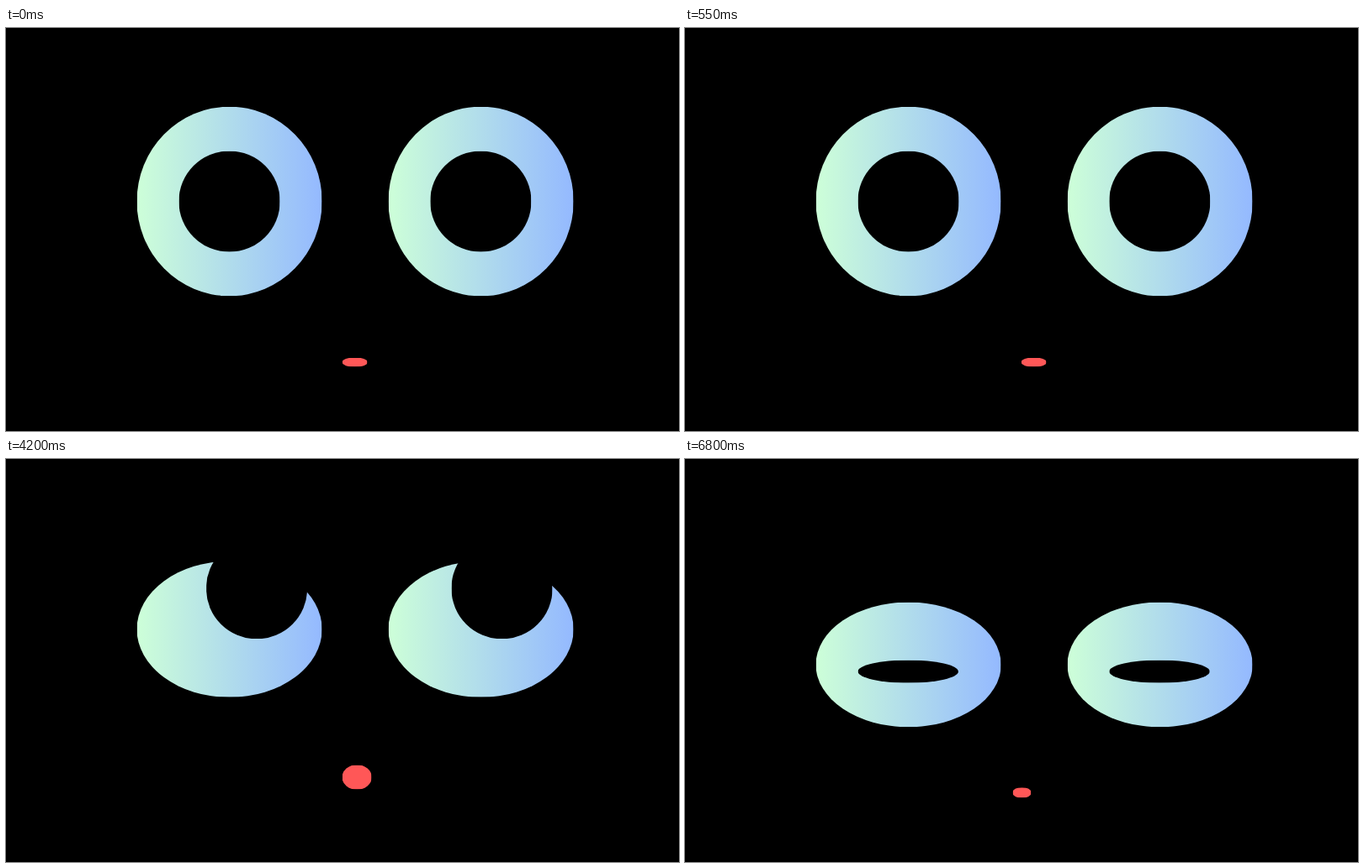
These frames come from a looping animation (800 by 480 pixels, 8000 ms). An HTML page:

```html
<!DOCTYPE html>
<html lang="en">
<head>
<meta charset="utf-8">
<title>Blinking eyes</title>
<style>
html, body { margin: 0; width: 100%; height: 100%; overflow: hidden; background: #000; }
body > svg { display: block; width: 100vw; height: 100vh; }
</style>
</head>
<body>
<svg id="stage" viewBox="0 0 800 480">
  <defs>
    <linearGradient id="iris">
      <stop offset="0" stop-color="#cdffd8"/>
      <stop offset="1" stop-color="#94b9ff"/>
    </linearGradient>
  </defs>
</svg>
<script>
const LOOP = 8000;
const NS = 'http://www.w3.org/2000/svg';
const stage = document.getElementById('stage');

// An ellipse trimmed slightly by its own box, which flattens its extremes.
function oval(fill, trim) {
  const box = document.createElementNS(NS, 'svg');
  const shape = document.createElementNS(NS, 'ellipse');
  box.setAttribute('overflow', 'hidden');
  shape.setAttribute('fill', fill);
  box.append(shape);
  stage.append(box);
  return (left, top, right, bottom) => {
    const w = right - left, h = bottom - top;
    const set = (el, attrs) => {
      for (const key in attrs) el.setAttribute(key, attrs[key]);
    };
    set(box, { x: left, y: top, width: w, height: h });
    set(shape, { cx: w / 2, cy: h / 2, rx: w / 2 + trim, ry: h / 2 + trim });
  };
}

const eyes = [oval('url(#iris)', 0.3), oval('url(#iris)', 0.3)];
const pupils = [oval('#000', 0.3), oval('#000', 0.3)];
const mouth = oval('#ff5757', 0.5);

const EYE_X = [155.8, 454.8];
const EYE_W = 219.6;
const OPEN = [94, 319];
const CENTRE = { x: [205.7, 504.5], y: [146.7, 266.4] };
const GLANCE = { x: [229, 517.8], y: [120, 240] };
const LOOK_UP = { x: [238.2, 529.7], y: [94.2, 214] };
const SLIT_TOP = 239.8;
const FLAT = [400, 392.9, 429.3, 403.3];
const ROUND = [400, 364.8, 434.3, 393.3];
const SMALL = [389.8, 391.5, 411.2, 403.3];

const mix = (a, b, k) => a + (b - a) * k;
const steps = (t, start, length) => Math.floor((t - start) / length) + 1;

function lids(t) {
  const [top, bottom] = OPEN;
  if (t >= 200 && t < 550) {
    const n = steps(t, 200, 50);
    return [top + 40 * Math.min(n, 8 - n), bottom];
  }
  if (t >= 4200 && t < 4250) return [122, 283.5];
  if (t >= 4250 && t < 4350) return [150, 248];
  if (t >= 6750) return [top + 38.4 * Math.min(steps(t, 6750, 50), 2), bottom];
  return OPEN;
}

function gaze(t) {
  if (t >= 2550 && t < 2700) return GLANCE;
  if (t >= 2700 && t < 4350) return LOOK_UP;
  return CENTRE;
}

// Pupils narrow and the mouth shrinks in five even steps.
function squint(t) {
  return t < 4850 ? 0 : Math.min(steps(t, 4850, 100) / 5, 1);
}

function draw(t) {
  const [top, bottom] = lids(t);
  const look = gaze(t);
  const k = squint(t);
  eyes.forEach((eye, i) => eye(EYE_X[i], top, EYE_X[i] + EYE_W, bottom));
  pupils.forEach((pupil, i) => {
    const x = look.x[i];
    pupil(x, mix(look.y[0], SLIT_TOP, k), x + 119.7 - 0.6 * k, look.y[1]);
  });
  mouth(...(t >= 2700 && t < 4350 ? ROUND : FLAT.map((v, i) => mix(v, SMALL[i], k))));
}

const began = performance.now();
function tick() {
  draw((performance.now() - began) % LOOP);
  requestAnimationFrame(tick);
}
draw(0);
requestAnimationFrame(tick);
</script>
</body>
</html>
```
